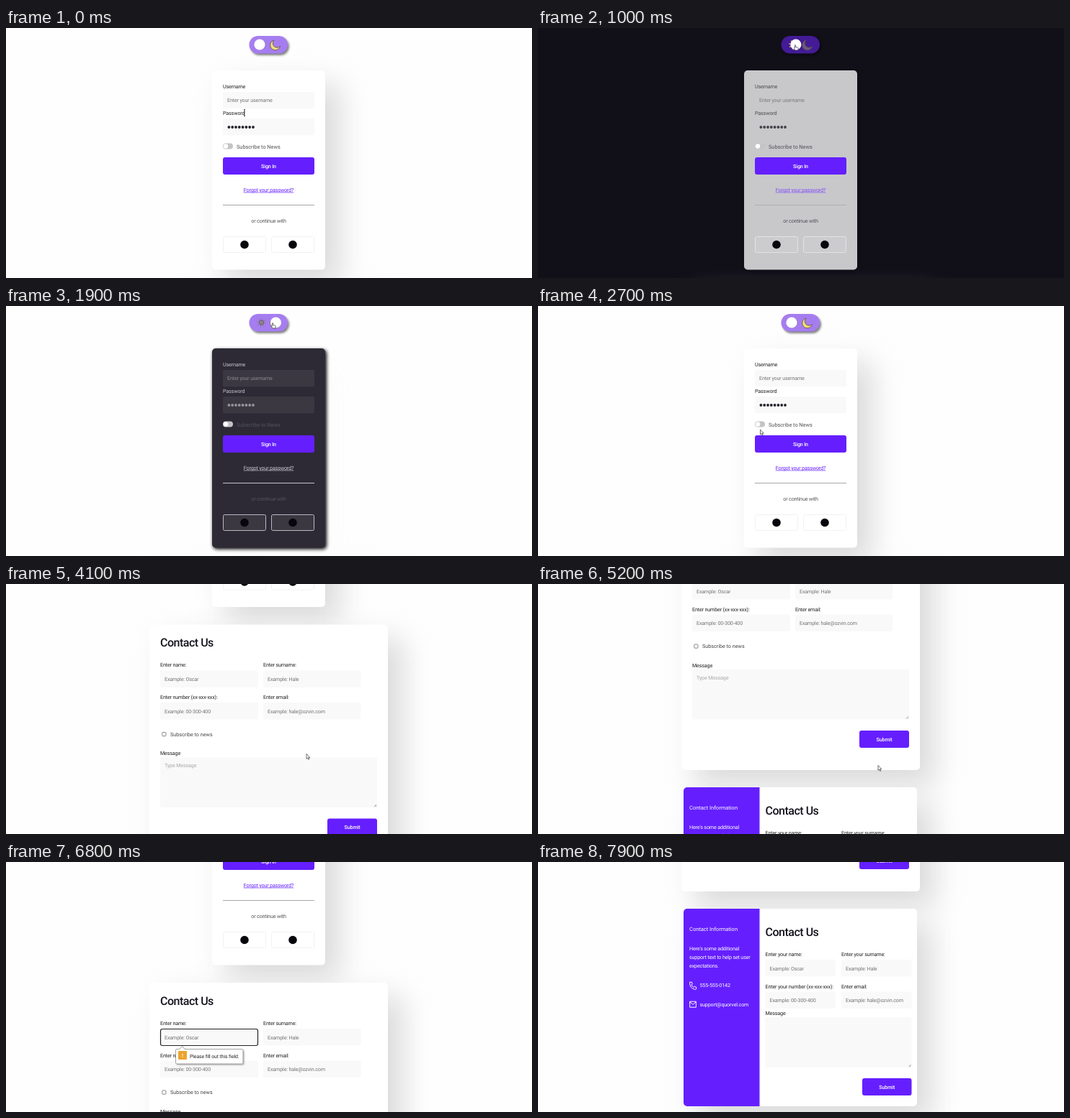
An HTML page for the animation above (8000 ms loop, 730x348 px).

```html
<!DOCTYPE html>
<html lang="en">
<head>
<meta charset="utf-8">
<title>Form themes</title>
<style>
  html, body { margin: 0; width: 100%; height: 100%; overflow: hidden; background: #fefefe; }
  svg { display: block; width: 730px; height: 348px; }
  text { font-family: Roboto, sans-serif; text-rendering: geometricPrecision; white-space: pre; }
</style>
</head>
<body>
<svg id="stage" viewBox="0 0 730 348" xmlns="http://www.w3.org/2000/svg"></svg>
<script>
const LOOP = 8000, PURPLE = '#651fff', INK = '#222', HINT = '#757575', FIELD = '#f9f9f9';
const stage = document.getElementById('stage');
const themed = [];

function add(parent, tag, attrs, body) {
  const el = document.createElementNS('http://www.w3.org/2000/svg', tag);
  for (const k in attrs) el.setAttribute(k, attrs[k]);
  if (body) el.textContent = body;
  parent.appendChild(el);
  return el;
}
const rect = (p, x, y, x2, y2, fill, more) =>
  add(p, 'rect', { x, y, width: x2 - x, height: y2 - y, fill, ...more });
const circle = (p, cx, cy, r, fill, more) => add(p, 'circle', { cx, cy, r, fill, ...more });
const path = (p, d, more) => add(p, 'path', { d, fill: 'none', ...more });
const text = (p, x, y, str, fill = INK, more) =>
  add(p, 'text', { x, y, fill, 'font-size': 7.2, 'letter-spacing': -0.17, ...more }, str);
const mid = { 'text-anchor': 'middle' };

const rgb = hex => [1, 3, 5].map(i => parseInt(hex.slice(i, i + 2), 16));
const mix = (a, b, k) => `rgb(${rgb(a).map((v, i) => Math.round(v + (rgb(b)[i] - v) * k))})`;
function theme(el, attr, light, dark) {
  themed.push({ el, attr, light, dark });
  return el;
}

const shade = (p, x, y, x2, y2) =>
  rect(p, x + 20, y + 20, x2 + 20, y2 + 20, '#d9d9d9', { style: 'filter:blur(20px)' });
const field = (p, x, y, x2, y2) => rect(p, x, y, x2, y2, FIELD, { rx: 2 });
function labelled(p, x, y, x2, label, hint) {
  text(p, x, y, label);
  field(p, x, y + 5, x2, y + 28.5);
  text(p, x + 6, y + 19.7, hint, HINT);
}
function area(p, x, y, x2, y2) {
  field(p, x, y, x2, y2);
  path(p, `M${x2 - 4} ${y2 - 1}l3 -3M${x2 - 2} ${y2 - 1}l1 -1`, { stroke: '#555', 'stroke-width': 0.6 });
}
function button(p, x, y, x2, label) {
  rect(p, x, y, x2, y + 24, PURPLE, { rx: 3 });
  text(p, (x + x2) / 2, y + 14.6, label, '#fff', { ...mid, 'font-weight': 500 });
}
const heading = (p, x, y) =>
  text(p, x, y, 'Contact Us', '#15131c', { 'font-size': 16, 'font-weight': 500, 'letter-spacing': -0.5 });

const back = rect(stage, 0, 0, 730, 348, '#fefefe');
const page = add(stage, 'g', {});

// Theme toggle
const toggleShade = rect(page, 339.5, 13.5, 393, 38, '#555', { rx: 12.5, opacity: 0.75, style: 'filter:blur(1.8px)' });
const toggle = rect(page, 337.5, 11, 391, 35.5, '#a67df0', { rx: 12.3 });
const sun = add(page, 'g', {});
circle(sun, 354.5, 23, 3.4, 'currentColor', { stroke: '#57506a', 'stroke-width': 0.7 });
circle(sun, 354.5, 23, 5.6, 'none', { stroke: 'currentColor', 'stroke-width': 1.6, 'stroke-dasharray': '1.4 3' });
const moon = path(page, 'M372 17A7 7 0 1 0 380.5 25.5A5.6 5.6 0 0 1 372 17Z',
  { stroke: '#575043', 'stroke-width': 0.8 });
const knob = circle(page, 352, 23, 7.6, '#fff');

// Sign-in card
const lightShade = shade(page, 286, 59, 443, 336);
const darkShade = rect(page, 287.5, 61, 445, 338.5, '#000', { rx: 5, style: 'filter:blur(2.4px)' });
theme(rect(page, 286, 59, 443, 336.5, '#fff', { rx: 5 }), 'fill', '#ffffff', '#272431');
[['Username', 83.6], ['Password', 120.6]].forEach(([str, y]) => {
  theme(text(page, 301, y, str), 'fill', '#222222', '#c9c8ce');
  theme(field(page, 301, y + 5.4, 428, y + 28.6), 'fill', '#f9f9f9', '#36333d');
});
theme(text(page, 307, 103, 'Enter your username'), 'fill', '#757575', '#8b8992');
for (let i = 0; i < 8; i++)
  theme(circle(page, 309.4 + i * 4.8, 138, 1.9, INK), 'fill', '#26242c', '#98969e');
rect(page, 301, 160.5, 315, 168.5, '#c4c4c6', { rx: 4 });
circle(page, 305, 164.5, 3.2, '#fff');
text(page, 320, 168.2, 'Subscribe to News', '#535359', { 'font-size': 7.4, 'letter-spacing': -0.04 });
button(page, 301, 180, 428, 'Sign In');
theme(text(page, 364.5, 227.6, 'Forgot your password?', PURPLE, { ...mid, 'text-decoration': 'underline' }),
  'fill', PURPLE, '#d2d0d8');
theme(rect(page, 301, 246, 428, 247, '#aaa'), 'fill', '#aaa6a4', '#c6c5c9');
text(page, 364.5, 271, 'or continue with', '#535359', mid);
for (const x of [301, 368]) {
  const box = rect(page, x + 0.5, 290.5, x + 59.5, 312.5, '#fff', { rx: 2, 'stroke-width': 0.9 });
  theme(box, 'fill', '#ffffff', '#36333d');
  theme(box, 'stroke', '#f0f0f0', '#c8c7cc');
  circle(page, x + 30, 301.5, 5.8, '#08060d');
}

// Wide contact form
shade(page, 199, 361, 530, 686);
rect(page, 199, 361, 530, 686, '#fff', { rx: 5 });
heading(page, 214, 392);
labelled(page, 214, 420, 350, 'Enter name:', 'Example: Oscar');
labelled(page, 357, 420, 492.5, 'Enter surname:', 'Example: Hale');
labelled(page, 214, 464.6, 350, 'Enter number (xx-xxx-xxx):', 'Example: 00-300-400');
labelled(page, 357, 464.6, 492.5, 'Enter email:', 'Example: hale@ozvin.com');
rect(page, 216.8, 511, 222, 516.2, '#fff', { rx: 1, stroke: '#6b6b6b', 'stroke-width': 0.8 });
text(page, 228, 516.2, 'Subscribe to news', '#444', { 'letter-spacing': 0 });
text(page, 214, 542.6, 'Message');
area(page, 214, 546, 515, 615.5);
text(page, 220, 560, 'Type Message', '#aaa');
button(page, 446, 631, 515, 'Submit');

// Contact form with side panel
shade(page, 202, 710, 526, 985);
rect(page, 202, 710, 526, 985, '#fff', { rx: 5 });
path(page, 'M307.5 710H207a5 5 0 0 0 -5 5V980a5 5 0 0 0 5 5H307.5Z', { style: 'fill:' + PURPLE });
text(page, 210, 741, 'Contact Information', '#fff', { 'font-size': 7.5, 'letter-spacing': 0 });
["Here's some additional", 'support text to help set user', 'expectations.']
  .forEach((str, i) => text(page, 210, 768.2 + i * 11.7, str, '#fff'));
const line = { stroke: '#fff', 'stroke-width': 1, 'stroke-linejoin': 'round' };
path(page, 'M210.7 812.2h2.6l1 2.7-1.3 1.3a8 8 0 0 0 3 3.2l1.3-1.2 2.3 1v2.4q-.5 1-2 .8A9.5 9.5 0 0 1 210.6 813.5Z', line);
path(page, 'M210.7 839.2h8.6v8h-8.6ZM210.9 840l4.1 3.4 4.1-3.4', line);
text(page, 224.5, 818.8, '555-555-0142', '#fff');
text(page, 224.5, 846, 'support@quorvel.com', '#fff');
heading(page, 315.5, 748);
labelled(page, 315.5, 776, 413, 'Enter your name:', 'Example: Oscar');
labelled(page, 421, 776, 518.5, 'Enter your surname:', 'Example: Hale');
labelled(page, 315.5, 820.6, 413, 'Enter your number (xx-xxx-xxx):', 'Example: 00-300-400');
labelled(page, 421, 820.6, 518.5, 'Enter email:', 'Example: hale@ozvin.com');
text(page, 315.5, 857.8, 'Message');
area(page, 315.5, 861, 518.5, 931);
button(page, 450, 946, 518.5, 'Submit');

// Validation hint
const ring = rect(page, 214.5, 425.5, 349.5, 448.5, 'none', { rx: 2.5, stroke: INK, 'stroke-width': 1.2 });
const tip = add(page, 'g', {});
const bubble = 'M237 453.5h4l3.5-4 3.5 4h79.500q1.500 0 1.500 1.500v17.500q0 1.500-1.500 1.500h-90.500q-1.500 0-1.500-1.500v-17.500q0-1.500 1.500-1.500Z';
path(tip, bubble, { transform: 'translate(1.5 1.5)', style: 'fill:#777;filter:blur(1.2px)', opacity: 0.6 });
path(tip, bubble, { style: 'fill:#fff', stroke: '#8c8c8c', 'stroke-width': 0.8 });
rect(tip, 239, 456, 251, 468, '#eda42d', { rx: 1 });
text(tip, 245, 464.6, '!', '#fff', { ...mid, 'font-weight': 700 });
text(tip, 255, 466, 'Please fill out this field.', INK, { 'font-size': 6.9, 'letter-spacing': -0.1 });

// Pointers
const outline = { stroke: '#333', 'stroke-width': 0.7, style: 'fill:#fff' };
const pointers = {
  beam: path(stage, 'M-1 -4.500h2M0 -4.500v9M-1 4.500h2', { stroke: INK, 'stroke-width': 0.8 }),
  arrow: path(stage, 'M0 0v7l1.600-1.400 1.200 2.400 1-.5-1.200-2.300h2.200Z', outline),
  hand: path(stage, 'M-.7 0q.7-.7 1.400 0v2.600l3 .7q.7.300.6 1l-.5 2.700h-3.600l-2.200-2.800q.3-.8 1.300-.2Z', outline)
};

const clamp = x => Math.max(0, Math.min(1, x));
const span = (t, a, b) => clamp((t - a) / (b - a));
const smooth = x => x * x * (3 - 2 * x);
const out = x => 1 - (1 - x) ** 2;

// Keys are [time, value, ...]; eased between neighbours
function track(keys, t, col = 1) {
  let i = 0;
  while (i < keys.length - 2 && t >= keys[i + 1][0]) i++;
  const [a, b] = [keys[i], keys[i + 1]];
  return a[col] + (b[col] - a[col]) * smooth(span(t, a[0], b[0]));
}
const scrollKeys = [[2950, 0], [3900, 300], [4050, 300], [4500, 427], [5850, 427], [6400, 193],
  [6820, 193], [7300, 600], [7720, 600], [7900, 645]];
const moveKeys = [[50, 331, 118], [850, 357, 24], [1000, 357, 24], [1350, 370, 24], [1950, 370, 24],
  [2650, 308.5, 172], [3000, 308.5, 172], [4500, 440, 250], [4900, 440, 250], [5200, 472, 252.5],
  [5650, 480, 219]];

const show = (el, on) => el.setAttribute('visibility', on ? 'visible' : 'hidden');

function draw(t) {
  const dark = t >= 940 && t < 1895;
  const k = t < 1895 ? out(span(t, 940, 1390)) : 1 - out(span(t, 1895, 2345));

  back.setAttribute('fill', dark ? '#110f18' : '#fefefe');
  toggle.setAttribute('fill', dark ? '#431b96' : '#a67df0');
  toggleShade.setAttribute('fill', dark ? '#09070e' : '#555');
  sun.setAttribute('color', dark ? '#f0cf62' : '#8d7f88');
  moon.setAttribute('fill', dark ? '#6f5a80' : '#f3de7c');
  knob.setAttribute('cx', 352 + 23 * k);
  lightShade.setAttribute('opacity', dark ? 0 : 1 - k);
  darkShade.setAttribute('opacity', k);
  for (const s of themed) s.el.setAttribute(s.attr, mix(s.light, s.dark, k));

  page.setAttribute('transform', `translate(0 ${-track(scrollKeys, t)})`);
  show(ring, t >= 6400);
  show(tip, t >= 6500 && t < 6850);

  const x = track(moveKeys, t), y = track(moveKeys, t, 2);
  const onToggle = y < 36 && t < 2700, onSubmit = t > 5500;
  const kind = t >= 6200 ? '' : t < 150 ? 'beam' : onToggle || onSubmit ? 'hand' : 'arrow';
  for (const name in pointers) {
    show(pointers[name], name === kind);
    pointers[name].setAttribute('transform', `translate(${x} ${y})`);
  }
}

const start = performance.now();
function tick() {
  draw((performance.now() - start) % LOOP);
  requestAnimationFrame(tick);
}
tick();
</script>
</body>
</html>
```
